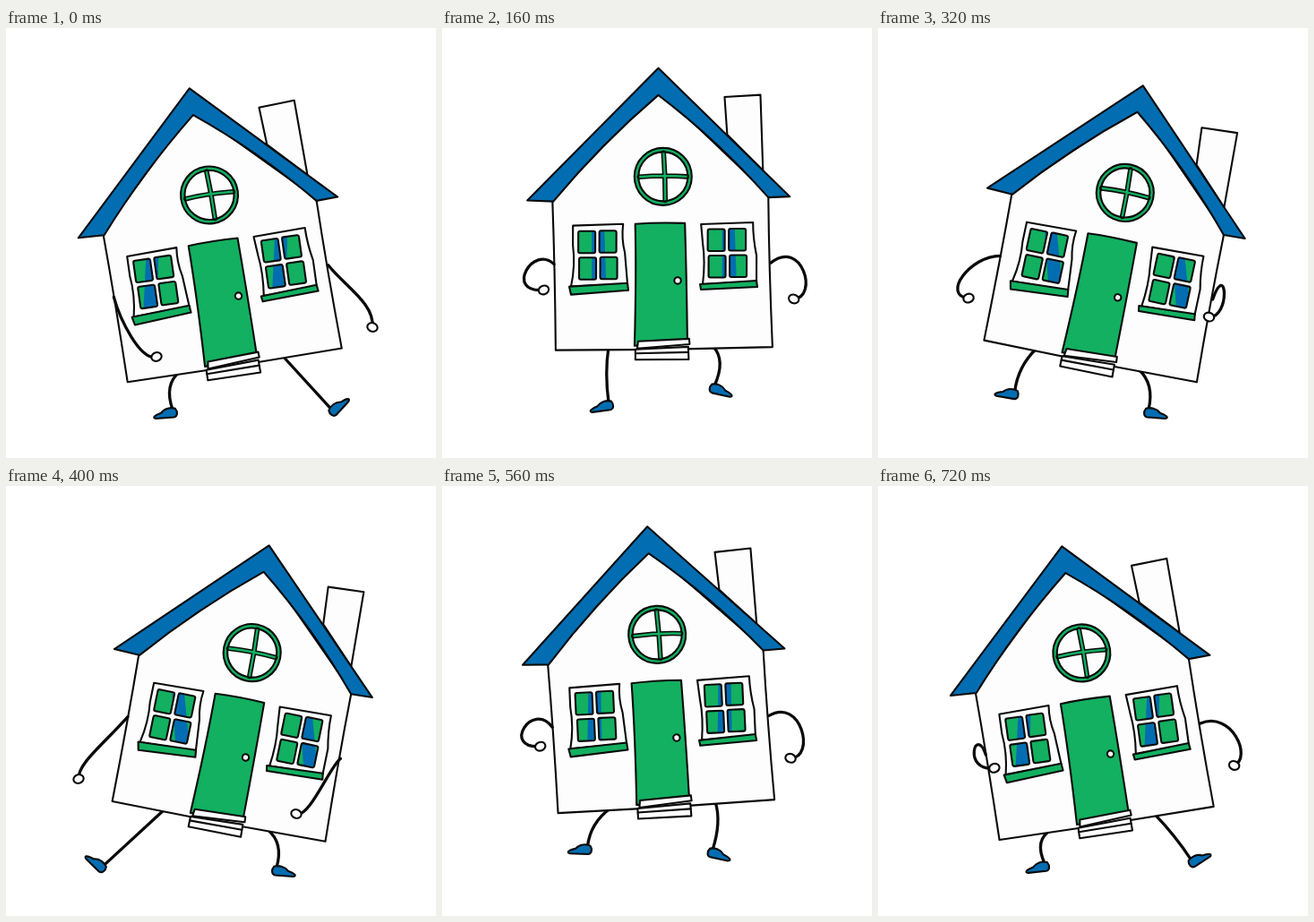
An HTML page for the animation above (800 ms loop, 480 by 480 pixels).

```html
<!DOCTYPE html>
<html lang="en">
<head>
<meta charset="utf-8">
<title>Walking house</title>
<style>
  html, body { margin: 0; width: 100%; height: 100%; overflow: hidden; background: #fff; }
  svg { display: block; width: 100%; height: 100%; }
  .ink { stroke: #0a0a0a; stroke-width: 2.1; stroke-linejoin: round; stroke-linecap: round; }
  .limb { fill: none; stroke-width: 3.3; }
  .wall { fill: #fdfdfd; }
  .blue { fill: #036db2; }
  .green { fill: #12b060; }
  .none { fill: none; }
</style>
</head>
<body>
<svg id="stage" viewBox="0 0 480 480"></svg>
<script>
const STEP = 80, COUNT = 10, TAU = Math.PI * 2;
const PIVOT = { x: 248, y: 307 };
const { sin, cos, min, max, abs, hypot } = Math;

// Arm keys: two curve handles and the hand
const ARMS = [
  { root: [125, 265], side: 1,
    front: [127, 325, 150, 372, 168, 367],
    tuck: [100, 237, 66, 293, 111, 289],
    back: [108, 289, 80, 310, 81, 327] },
  { root: [367, 263], side: -1,
    front: [362, 312, 338, 372, 324, 366],
    tuck: [403, 232, 421, 300, 392, 301],
    back: [378, 288, 412, 308, 409, 334] }
];

// side: -1 steps out to the left; peak: step of the longest reach
const LEGS = [
  { root: [186, 358], side: -1, rest: 186, reach: 82, peak: 5.4 },
  { root: [303, 357], side: 1, rest: 302, reach: 62, peak: 9.8 }
];
const GROUND = 426, LIFT = 27, LEG = 70;
const SHOE = "M3,-1C6,3 5,8 1,8.5L-19,9C-24,8 -20,5 -13,3C-9,-2 -2,-3 3,-1Z";

const stage = document.getElementById("stage");

function add(parent, tag, cls, attrs = {}) {
  const el = document.createElementNS("http://www.w3.org/2000/svg", tag);
  if (cls) el.setAttribute("class", cls);
  for (const k in attrs) el.setAttribute(k, attrs[k]);
  return parent.appendChild(el);
}
const path = (parent, cls, d) => add(parent, "path", cls, { d });
const circle = (parent, cls, cx, cy, r) => add(parent, "circle", cls, { cx, cy, r });

const legLayer = add(stage, "g");
const house = add(stage, "g");
const armLayer = add(stage, "g");
const gaps = [];

function addWindow(id, frame, sill, x, y, mid) {
  path(house, "ink wall", frame);
  const clip = add(house, "clipPath", "", { id });
  const panes = [[0, 0], [23.5, -0.5], [1, 29.5], [24.5, 29]].map(([dx, dy]) =>
    ({ x: x + dx, y: y + dy, width: 19, height: 24.5, rx: 2 }));
  panes.forEach(p => {
    add(clip, "rect", "", p);
    add(house, "rect", "green", p);
  });
  const el = add(house, "path", "blue", { "clip-path": `url(#${id})` });
  gaps.push({ el, mid, top: y - 3, bottom: y + 56 });
  panes.forEach(p => add(house, "rect", "ink none", p));
  path(house, "ink green", sill);
}

function buildHouse() {
  path(house, "ink wall", "M315,78L355,75.5L358,160L318,120Z");
  path(house, "ink wall", "M123,192L241,70L364,187Q365,270 369,357L247,360L127,361Q126,270 123,192Z");
  path(house, "ink blue", "M95,194L241,46L388,189L364,190Q307,126 241,76Q177,131 124,195Z");

  circle(house, "ink green", 246.5, 167, 32);
  circle(house, "ink wall", 246.5, 167, 27.5);
  const cross = "M247,140.5Q249,167 249,193.5M220,167.5Q246,165 273,167";
  path(house, "ink none", cross).style.strokeWidth = 5.6;
  const bars = path(house, "none", cross);
  bars.setAttribute("stroke", "#12b060");
  bars.setAttribute("stroke-width", 2.4);

  addWindow("paneL",
    "M146,222L202,220Q200,236 204,252L207,287L144,290Q149,266 146,244Z",
    "M142,290L207,286L208,294L144,299Z", 152, 228, 173);
  addWindow("paneR",
    "M289,220L347,218Q347,236 351,255L351,284L291,287Q294,262 291,242Z",
    "M288,287L351,283L352,290L289,293Z", 296.5, 225.5, 318.5);

  path(house, "ink green", "M215.5,220Q240,218 271,219Q273,280 274,350L215,356Q217,280 215.5,220Z");
  circle(house, "ink wall", 263, 283, 3.7);
  path(house, "ink wall", "M216,360L275,357L275.5,371L216,371.5Z");
  path(house, "ink wall", "M219,351L276,348L276.5,354L218,359Z");
  path(house, "ink none", "M216,364.5L275,363");
}

const armParts = ARMS.map(arm => ({
  ...arm,
  line: path(armLayer, "ink limb", ""),
  hand: add(armLayer, "ellipse", "ink wall", { rx: 5.8, ry: 4.8 })
}));
const legParts = LEGS.map(leg => ({
  ...leg,
  line: path(legLayer, "ink limb", ""),
  shoe: path(legLayer, "ink blue", SHOE)
}));

// Whole-body motion as sums of harmonics of the walk cycle
const tiltAt = p => 0.7 - 9.8 * cos(p) + 4.3 * sin(p)
  + 1.1 * cos(2 * p) - 1.3 * sin(2 * p) - 0.5 * sin(3 * p) + 0.3 * sin(4 * p);
const bounceAt = p => 8.8 + 1.9 * cos(p) - 1.1 * sin(p)
  + 9.3 * cos(2 * p) - 3.8 * sin(2 * p)
  - 1.2 * cos(3 * p) + 0.7 * sin(3 * p) - 0.9 * cos(4 * p);

function onHouse([px, py], tilt, bounce) {
  const a = tilt * TAU / 360, x = px - PIVOT.x, y = py - PIVOT.y;
  return [
    PIVOT.x + x * cos(a) - y * sin(a),
    PIVOT.y + bounce + x * sin(a) + y * cos(a)
  ];
}

// The arms rest tucked and swing sharply, one forward as the other goes back
function drawArm({ side, tuck, front, back, line, hand }, phase, root) {
  const beat = 2 * cos(phase - 0.17) ** 5 * side;
  const key = beat > 0 ? front : back;
  const swing = min(1, abs(beat));
  const p = tuck.map((v, i) => v + (key[i] - v) * swing);
  line.setAttribute("d", `M${root}C${p}`);
  hand.setAttribute("transform", `translate(${p[4]},${p[5]}) rotate(${-20 * side})`);
}

// The foot lifts on its way out and back; a slack leg bends outwards
function drawLeg({ side, rest, reach, peak, line, shoe }, phase, [hx, hy]) {
  const q = phase - peak / COUNT * TAU;
  const out = max(0, cos(q)) ** 2;
  const fromPeak = Math.acos(cos(q));
  const lift = sin(min(1.2 * fromPeak, Math.PI)) ** 2;
  const x = rest + side * reach * out, y = GROUND - LIFT * lift;
  const bend = 0.5 * max(0, LEG - hypot(x - hx, y - hy));
  const knee = [(hx + x) / 2 + side * bend, (hy + y) / 2 - bend / 2];
  const toe = 53 * out - 10 * lift - 3;
  line.setAttribute("d", `M${hx},${hy}Q${knee} ${x},${y}`);
  shoe.setAttribute("transform",
    `translate(${x},${y}) scale(${-side},1) rotate(${toe})`);
}

function draw(step) {
  const phase = step / COUNT * TAU;
  const tilt = tiltAt(phase), bounce = bounceAt(phase);
  house.setAttribute("transform",
    `translate(0,${bounce}) rotate(${tilt},${PIVOT.x},${PIVOT.y})`);
  // Curtains hang with gravity, so the gap leans against the tilt
  const lean = tilt * 1.4;
  gaps.forEach(({ el, mid, top, bottom }) => el.setAttribute("d",
    `M${mid - 6},${top}H${mid + 8}L${mid + 10 + lean},${bottom}H${mid - 6 + lean}Z`));
  armParts.forEach(arm => drawArm(arm, phase, onHouse(arm.root, tilt, bounce)));
  legParts.forEach(leg => drawLeg(leg, phase, onHouse(leg.root, tilt, bounce)));
}

buildHouse();
const start = performance.now();
let shown = -1;

function tick() {
  const step = Math.floor((performance.now() - start) / STEP) % COUNT;
  if (step !== shown) draw(shown = step);
  requestAnimationFrame(tick);
}
tick();
</script>
</body>
</html>
```
